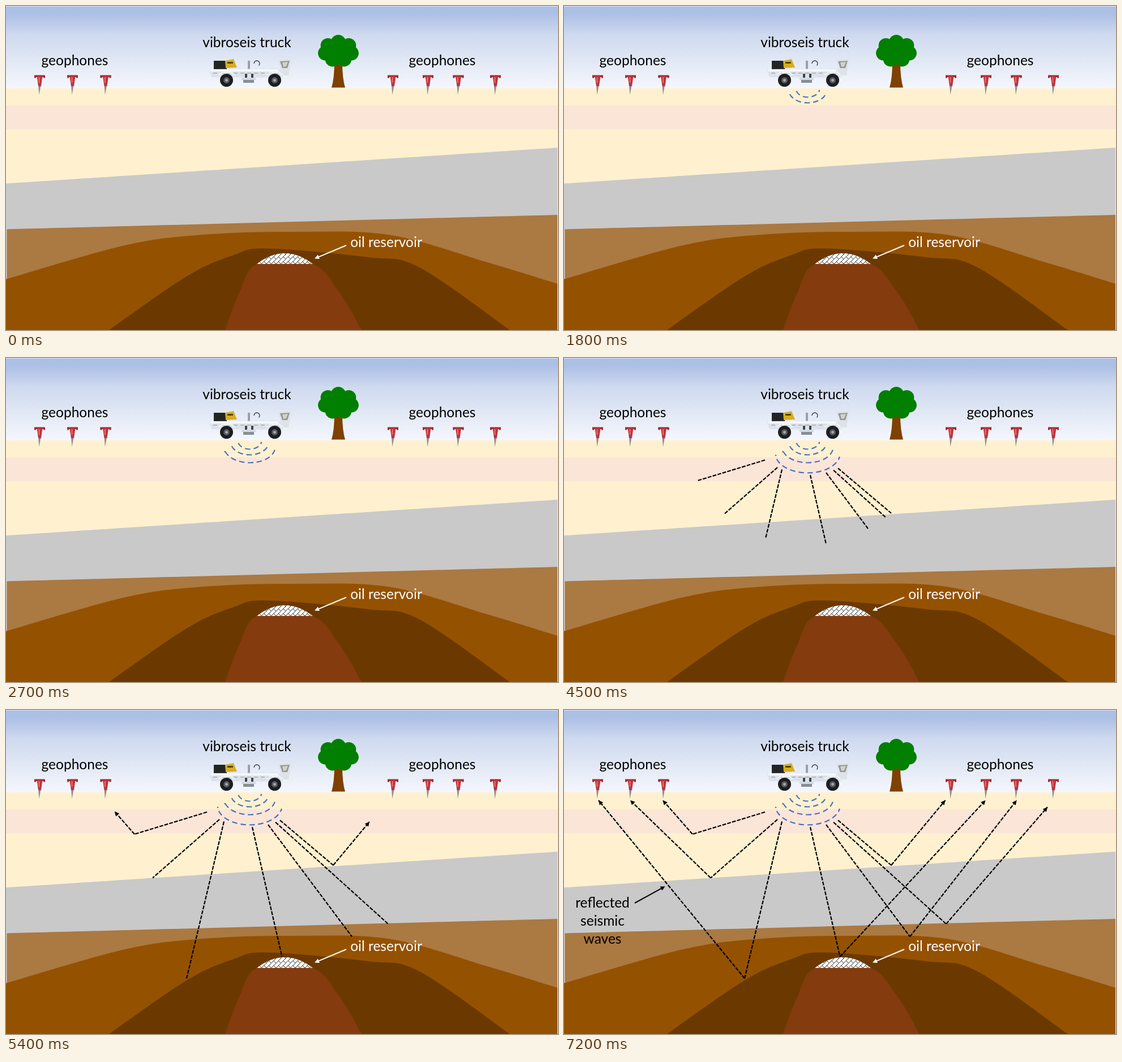
These frames come from a looping animation (975 by 574 pixels, 8.1 s). An HTML page with a canvas:

```html
<!DOCTYPE html>
<html lang="en">
<head>
<meta charset="utf-8">
<title>Seismic survey</title>
<style>
html, body { margin: 0; width: 100%; height: 100%; overflow: hidden; }
canvas { display: block; }
</style>
</head>
<body>
<canvas id="stage" width="975" height="574"></canvas>
<script>
const W = 975, H = 574, EDGE = 974;
const STEP = 900, STEPS = 9, WAVES = 4;
const ctx = document.getElementById('stage').getContext('2d');

function fill(color, ...pts) {
  ctx.fillStyle = color;
  ctx.beginPath();
  pts.forEach(p => ctx.lineTo(...p));
  ctx.fill();
}

function rect(color, x, y, w, h) {
  ctx.fillStyle = color;
  ctx.fillRect(x, y, w, h);
}

function disc(color, x, y, r) {
  ctx.fillStyle = color;
  ctx.beginPath();
  ctx.arc(x, y, r, 0, Math.PI * 2);
  ctx.fill();
}

function line(color, width, ...pts) {
  ctx.strokeStyle = color;
  ctx.lineWidth = width;
  ctx.beginPath();
  pts.forEach(p => ctx.lineTo(...p));
  ctx.stroke();
}

function mix(a, b, k) {
  return a.map((v, i) => v + (b[i] - v) * k);
}

function distance(a, b) {
  return Math.hypot(b[0] - a[0], b[1] - a[1]);
}

// Smooth ridge through the points, filled down to the bottom of the stage
function hill(color, ...pts) {
  const last = pts.length - 1;
  ctx.fillStyle = color;
  ctx.beginPath();
  ctx.moveTo(...pts[0]);
  for (let i = 0; i < last; i++) {
    const b = pts[i], c = pts[i + 1];
    const a = pts[i - 1] || b, d = pts[i + 2] || c;
    ctx.bezierCurveTo(
      b[0] + (c[0] - a[0]) / 6, b[1] + (c[1] - a[1]) / 6,
      c[0] - (d[0] - b[0]) / 6, c[1] - (d[1] - b[1]) / 6, ...c);
  }
  ctx.lineTo(pts[last][0], H);
  ctx.lineTo(pts[0][0], H);
  ctx.fill();
}

function arrowHead(color, from, tip) {
  ctx.save();
  ctx.translate(...tip);
  ctx.rotate(Math.atan2(tip[1] - from[1], tip[0] - from[0]));
  fill(color, [0, 0], [-8, -4], [-8, 4]);
  ctx.restore();
}

function arrow(color, from, tip) {
  line(color, 2, from, mix(from, tip, 1 - 5 / distance(from, tip)));
  arrowHead(color, from, tip);
}

function text(str, x, y, color = '#000') {
  ctx.font = '24.5px Lato, "Open Sans", sans-serif';
  ctx.textAlign = 'center';
  ctx.fillStyle = color;
  ctx.fillText(str, x, y);
}

function drawGround() {
  const sky = ctx.createLinearGradient(0, 0, 0, 147);
  sky.addColorStop(0, '#abc0e5');
  sky.addColorStop(0.1, '#adc0e6');
  sky.addColorStop(0.35, '#cfdaef');
  sky.addColorStop(1, '#f5f7fc');
  rect(sky, 0, 0, W, 147);
  rect('#e4eaf5', 0, 0, W, 1);
  rect('#fff1cf', 0, 146, W, H);
  rect('#fbe5d7', 0, 176, W, 42.5);
  hill('#c9c9c9', [0, 314.5], [EDGE, 251]);
  hill('#ab7942', [1.5, 395.5], [EDGE, 370]);
  hill('#945200', [0, 484], [210, 424], [350, 405], [513, 400], [680, 406], [850, 454], [EDGE, 492]);
  hill('#6b3900', [182, H], [319, 479], [400, 442], [460, 429.5], [640, 445], [730, 463], [890, H]);
  hill('#843b0e', [387, H], [411, 511], [444, 457], [541, 457], [590, 509], [628, H]);
}

function drawReservoir() {
  const left = 443, right = 542, base = 457, brick = 8.5;
  ctx.save();
  ctx.beginPath();
  ctx.moveTo(left, base);
  ctx.quadraticCurveTo((left + right) / 2, base - 38, right, base);
  ctx.clip();
  rect('#fff', left, base - 20, right - left, 20);
  for (let y = base - 3 * brick; y < base; y += brick) {
    for (let x = left; x < right; x += brick) {
      line('#222', 1, [x + brick, y], [x, y + brick]);
      line('#222', 1, [x + brick / 2, y + brick / 2], [x + brick, y + brick]);
    }
  }
  ctx.restore();
}

function drawTree() {
  const x = 587, y = 80, lobes = 7;
  ctx.fillStyle = '#7f4000';
  ctx.beginPath();
  ctx.moveTo(x - 7, 100);
  ctx.quadraticCurveTo(x - 7, 128, x - 12, 144.5);
  ctx.lineTo(x + 12, 144.5);
  ctx.quadraticCurveTo(x + 7, 128, x + 7, 100);
  ctx.fill();
  disc('#007f00', x, y, 19);
  for (let i = 0; i < lobes; i++) {
    const a = i / lobes * Math.PI * 2;
    disc('#007f00', x + 23.5 * Math.sin(a), y - 16 * Math.cos(a), 13);
  }
}

function drawWheel(x) {
  const y = 131.5;
  line('#eef1f5', 3, [x - 14, y - 9], [x - 7, y - 14], [x + 8, y - 14], [x + 14, y - 9]);
  disc('#1d1e20', x, y, 11.5);
  disc('#55585d', x, y, 5.5);
  disc('#a4a7ab', x, y, 2.5);
}

function drawTruck() {
  // engine
  rect('#222426', 367, 97, 23, 15);
  fill('#d8ae1e', [387, 97], [402, 94], [408, 109], [388, 110]);
  rect('#4d4218', 391, 99, 10, 3);
  // mast and hose
  rect('#9aa0aa', 427, 97, 4, 16);
  ctx.strokeStyle = '#33363b';
  ctx.lineWidth = 1.3;
  ctx.beginPath();
  ctx.arc(443, 102, 5, Math.PI, Math.PI * 2.25);
  ctx.stroke();
  // chassis
  fill('#dde2ea', [359, 112], [481, 111], [491, 117], [488, 127], [363, 126]);
  rect('#f5f7fa', 361, 112, 120, 4);
  for (let x = 366; x < 480; x += 12) rect('#b3bac5', x, 118, 7, 2);
  // vibrator pad
  for (const x of [422, 433]) rect('#3d434c', x, 120, 4, 9);
  rect('#d4dae2', 416, 127, 25, 4);
  rect('#858d98', 419, 131, 19, 5);
  // cab
  fill('#dfe3e8', [481, 96], [504, 94], [499, 123], [488, 123]);
  fill('#92979e', [484, 98], [501, 97], [497, 110], [488, 110]);
  fill('#d3d4c2', [488, 100], [498, 99], [495, 107], [490, 108]);
  drawWheel(389.5);
  drawWheel(474.5);
}

function drawGeophone(x) {
  fill('#8d8f92', [x - 2.5, 141], [x + 2, 141], [x - 1, 157.5]);
  rect('#a9272f', x - 9.5, 122.5, 19, 3.5);
  for (const side of [-1, 1]) rect('#a9272f', x + side * 8 - 1.5, 123, 3, 4.5);
  fill('#bd343b', [x - 5, 124], [x + 5, 124], [x + 2.5, 142], [x - 2.5, 142]);
  rect('#e2777a', x - 2, 126, 2, 10);
}

function drawWave(i) {
  const ry = 15 + 6.3 * i;
  const bottom = 161.5 + 8 * i + 2 * i * i;
  ctx.strokeStyle = '#4472c4';
  ctx.lineWidth = 2.2;
  ctx.setLineDash([9.5, 6]);
  ctx.beginPath();
  ctx.ellipse(430.5, bottom - ry, 21 + 12 * i, ry, 0, Math.PI * 0.91, Math.PI * 0.05, true);
  ctx.stroke();
  ctx.setLineDash([]);
  if (i > 1) disc('#4472c4', 411.5 - 12.5 * i, 153 + 6.5 * i, 1.3);
}

// start x, reflection x and y, end x, end y
const rays = [
  [355, 227, 220, 174.5],
  [377, 259, 297.5, 117],
  [385, 319, 475.5, 61],
  [435, 487.5, 437, 744.5],
  [463, 611, 401.5, 799.5],
  [476, 675, 379, 854, 172],
  [484, 578, 275, 673.5]
];

// Rays leave from a curved front just outside the waves
function front(x) {
  return [x, 207.5 - 0.0045 * (x - 432) ** 2];
}

function dashes(from, to) {
  ctx.setLineDash([6.75, 2.25]);
  line('#000', 2.2, from, to);
  ctx.setLineDash([]);
}

function drawRay([startX, turnX, turnY, endX, endY = 160], step) {
  const start = front(startX), turn = [turnX, turnY];
  const down = step > 5 ? 1 : Math.min(1, 125 / distance(start, turn));
  dashes(start, mix(start, turn, down));

  // Shallow reflections come back first
  const back = step > 6 ? 1 : step === 6 && turnY < 280 ? 0.67 : 0;
  if (!back) return;
  const tip = mix(turn, [endX, endY], back);
  dashes(turn, tip);
  arrowHead('#000', turn, tip);
}

function draw(time) {
  const step = Math.floor(time / STEP) % STEPS;
  drawGround();
  drawReservoir();
  drawTree();
  drawTruck();
  [59.5, 117.5, 176, 683.5, 745.5, 799, 864.5].forEach(drawGeophone);

  for (let i = 0; i < Math.min(step, WAVES); i++) drawWave(i);
  if (step > WAVES) rays.forEach(ray => drawRay(ray, step));

  text('geophones', 121.5, 105);
  text('vibroseis truck', 425.5, 73);
  text('geophones', 770.5, 105);
  text('oil reservoir', 671.5, 426.5, '#fff');
  arrow('#fff', [601, 424], [545, 447.5]);

  if (step === STEPS - 1) {
    ['reflected', 'seismic', 'waves'].forEach((word, i) => text(word, 68, 349.5 + i * 32));
    arrow('#000', [125, 342], [178.5, 312.5]);
  }
}

const began = performance.now();
function tick() {
  draw(performance.now() - began);
  requestAnimationFrame(tick);
}
tick();
</script>
</body>
</html>
```
